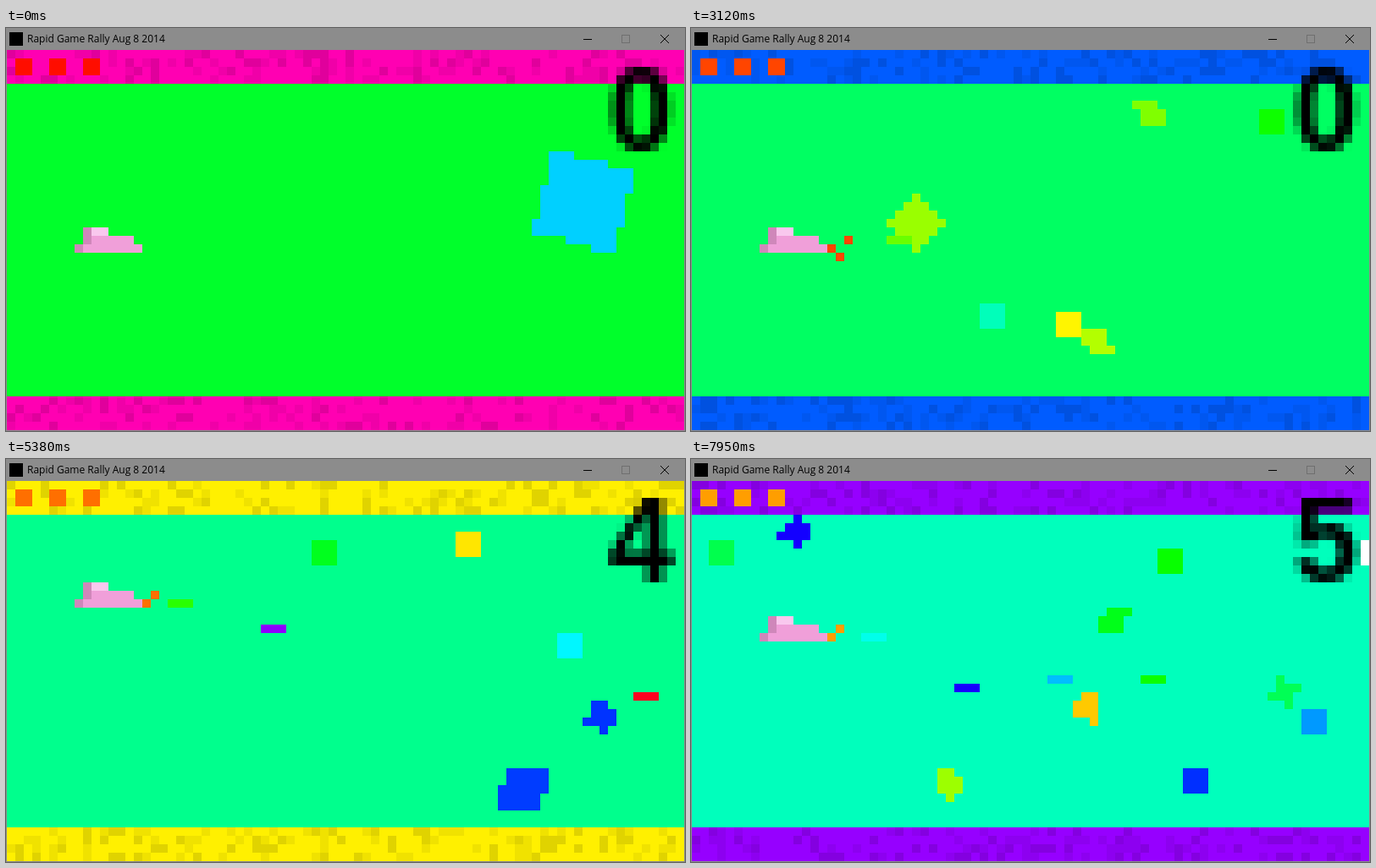
An HTML page with a canvas for the animation above (8 s loop, 802 by 477 pixels).

```html
<!DOCTYPE html>
<html lang="en">
<head>
<meta charset="utf-8">
<style>
  html, body { margin: 0; width: 100%; height: 100%; overflow: hidden; background: #8c8c8c; }
  canvas { display: block; }
</style>
</head>
<body>
<canvas id="stage" width="802" height="477"></canvas>
<script>
const ctx = document.getElementById('stage').getContext('2d');
const LOOP = 8000, COLS = 80, ROWS = 45, CELL = 10, LEFT = 1, TOP = 26;
const STEP = 77;            // usual ms between pictures
const DRIFT = 0.0043;       // hue degrees per ms
const FIRE_GAP = 550 / 3;   // ms between shots
const FIRST_SHOT = 15;

const BEATS = [0, 970, 2200, 3990, 5380, 6240, 7950, 8027];

// [time, row of the ship's top]
const SHIP_PATH = [[0, 21], [970, 33], [2200, 16], [3123, 21], [3490, 25], [3673, 14],
  [3990, 14], [4407, 23], [5140, 15], [5320, 12], [5510, 12], [5870, 18], [6240, 18],
  [7707, 22], [7890, 16]];

const SHOTS_THAT_HIT = [17, 20, 24, 25, 26, 30, 37, 38];
const SHOT_HUES = [105, 159, 143, 200, 20, 310, 72, 293, 115, 172, 194, 71, 60, 240, 130,
  20, 167, 230, 265, 180];
const SCORE_TIMES = [3200, 3700, 4800, 5200, 6092];

const rocks = [];
const wave = time => (x, y, hue, options) =>
  rocks.push({ time, x, y, hue, side: 30, tilt: 0, speed: 0.37, end: LOOP, ...options });

let rock = wave(0);
rock(682, 206, 191, { side: 100, tilt: 15, speed: 0.465 });

rock = wave(2200);
rock(521, 231, 80, { side: 50, tilt: 40, speed: 0.3, end: 3200 });
rock(746, 348, 54, { speed: 0.35 });
rock(756, 341, 160, { tilt: 12, speed: 0.465 });

rock = wave(3990);
rock(196, 101, 94);
rock(46, 371, 82, { speed: 0.465 });
rock(506, 336, 128, { side: 50, tilt: 38, speed: 0.42 });

rock = wave(5380);
rock(546, 104, 54, { speed: 0.302 });
rock(376, 111, 127, { speed: 0.1335 });
rock(666, 221, 182, { end: 6092 });
rock(703, 306, 228, { tilt: 25 });
rock(611, 391, 226, { side: 50, tilt: 8, speed: 0.297 });

rock = wave(6240);
rock(625, 86, 237, { tilt: 25, speed: 0.292 });
rock(718, 294, 40, { tilt: 17, speed: 0.146 });
rock(703, 336, 133, { tilt: 25, speed: 0.45 });
rock(536, 426, 174, { tilt: 15 });
rock(806, 121, 111, { speed: 0.14 });

rock = wave(7950);
rock(500, 190, 126, { tilt: 12 });
rock(304, 386, 83, { tilt: 17 });
rock(596, 381, 229);
rock(736, 311, 204);
rock(701, 276, 140, { tilt: 25 });
rock(810, 111, 0);

const hsl = hue => `hsl(${hue} 100% 50%)`;
const mod = (a, n) => ((a % n) + n) % n;

function noise(a, b) {
  const v = Math.sin(a * 127.1 + b * 311.7) * 43758.5453;
  return v - Math.floor(v);
}

function cells(color, col, row, w = 1, h = 1) {
  ctx.fillStyle = color;
  ctx.fillRect(LEFT + col * CELL, TOP + row * CELL, w * CELL, h * CELL);
}

function stepTime(t) {
  const i = BEATS.findLastIndex(beat => beat <= t);
  const start = BEATS[i], span = BEATS[i + 1] - start;
  const count = Math.round(span / STEP), step = span / count;
  return start + Math.min(count - 1, Math.floor((t - start + 4) / step)) * step;
}

function shipRow(t) {
  const i = SHIP_PATH.findIndex(point => point[0] > t);
  if (i < 0) return SHIP_PATH.at(-1)[1];
  const [t0, a] = SHIP_PATH[i - 1], [t1, b] = SHIP_PATH[i];
  return Math.round(a + (b - a) * (t - t0) / (t1 - t0));
}

function drawBorders(t) {
  const scroll = Math.round(t * 0.03);
  for (const top of [0, 41]) {
    cells(hsl(318 + t * 0.0852), 0, top, COLS, 4);
    for (let row = 0; row < 4; row++) {
      for (let col = 0; col < COLS; col++) {
        const n = noise(col + scroll, top + row);
        if (n < 0.36) cells(`rgba(0,0,0,${n < 0.17 ? 0.12 : 0.06})`, col, top + row);
      }
    }
  }
}

// A turning square, sampled at the centre of each cell.
function drawRock(t, { time, x, y, hue, side, tilt, speed, end }) {
  const age = t - time, left = x - speed * age;
  if (t >= end || left < -80 || left > 880) return;
  const turn = mod(tilt + age * 0.108, 90);
  const angle = (turn < 7 || turn > 83 ? 0 : turn) * Math.PI / 180;
  const cos = Math.cos(angle), sin = Math.sin(angle);
  const cx = (left - LEFT) / CELL, cy = (y - TOP) / CELL;
  const half = side / CELL / 2, reach = half * 1.5;
  const color = left > 807 ? '#fff' : hsl(hue + age * DRIFT);
  for (let row = Math.floor(cy - reach); row <= cy + reach; row++) {
    for (let col = Math.floor(cx - reach); col <= cx + reach; col++) {
      const dx = col + 0.501 - cx, dy = row + 0.501 - cy;
      const u = dx * cos + dy * sin, v = dy * cos - dx * sin;
      if (u >= -half && u < half && v >= -half && v < half) cells(color, col, row);
    }
  }
}

function drawShots(t, sparkColor) {
  const firedAt = n => 190 + n * FIRE_GAP;
  const latest = Math.floor((t - firedAt(0)) / FIRE_GAP + 0.001);
  if (latest < FIRST_SHOT) return;
  let survivor = 0;
  for (let n = FIRST_SHOT; n <= latest; n++) {
    if (SHOTS_THAT_HIT.includes(n)) {
      if (n === 20 || t - firedAt(n) > 400) continue;
    }
    const age = t - firedAt(n), x = 161 + 0.6 * age;
    const hits = SHOTS_THAT_HIT.includes(n);
    const hue = hits ? n * 137 : SHOT_HUES[survivor++] - age * 0.0814;
    if (x > 805 || (hits && age > 120)) continue;
    cells(age < 30 ? '#fff' : hsl(hue), Math.round((x - LEFT) / CELL), shipRow(firedAt(n)) + 2, 3);
  }
  const age = t - firedAt(latest), nose = shipRow(t) + 2;
  cells(sparkColor, 16, nose);
  if (age > 100) {
    cells(sparkColor, 18, nose - 1);
    cells(sparkColor, 17, nose + 1);
  } else if (age > 40) {
    cells(sparkColor, 17, nose - 1);
  }
}

function drawShip(row) {
  cells('#f9c8ee', 10, row, 2);
  cells('#cf87ba', 9, row, 1, 2);
  cells('#f09fd9', 10, row + 1, 5);
  cells('#cf87ba', 8, row + 2);
  cells('#f09fd9', 9, row + 2, 7);
}

// The score is small text enlarged without smoothing.
const small = document.createElement('canvas');
small.width = COLS;
small.height = ROWS;
const smallCtx = small.getContext('2d');
smallCtx.font = 'bold 14px "Liberation Sans", Arial, sans-serif';

function drawScore(t) {
  smallCtx.clearRect(0, 0, COLS, ROWS);
  smallCtx.fillText(SCORE_TIMES.filter(time => t >= time).length, 71, 12);
  ctx.imageSmoothingEnabled = false;
  ctx.drawImage(small, LEFT, TOP, COLS * CELL, ROWS * CELL);
}

function drawWindow() {
  ctx.fillStyle = '#8c8c8c';
  ctx.fillRect(0, 0, 802, TOP);
  ctx.fillRect(0, 0, 1, 477);
  ctx.fillRect(801, 0, 1, 477);
  ctx.fillRect(0, 476, 802, 1);
  ctx.fillStyle = '#000';
  ctx.fillRect(4, 5, 16, 16);
  ctx.font = '12px "Open Sans", "Noto Sans", sans-serif';
  ctx.fillText('Rapid Game Rally Aug 8 2014', 25, 17);
  ctx.fillRect(682, 13, 10, 1);
  ctx.strokeStyle = '#6f6f6f';
  ctx.strokeRect(727.5, 8.5, 9, 9);
  ctx.strokeStyle = '#000';
  ctx.beginPath();
  ctx.moveTo(773, 8);
  ctx.lineTo(783, 18);
  ctx.moveTo(783, 8);
  ctx.lineTo(773, 18);
  ctx.stroke();
}

function draw(now) {
  const t = stepTime(now % LOOP);
  const hue = 130 + t * DRIFT, warm = hsl(hue - 127);
  cells(hsl(hue), 0, 0, COLS, ROWS);
  drawBorders(t);
  rocks.forEach(item => drawRock(t, item));
  drawShots(t, warm);
  drawShip(shipRow(t));
  for (const col of [1, 5, 9]) cells(warm, col, 1, 2, 2);
  drawScore(t);
  drawWindow();
}

const started = performance.now();
function tick() {
  draw(performance.now() - started);
  requestAnimationFrame(tick);
}
tick();
</script>
</body>
</html>
```
